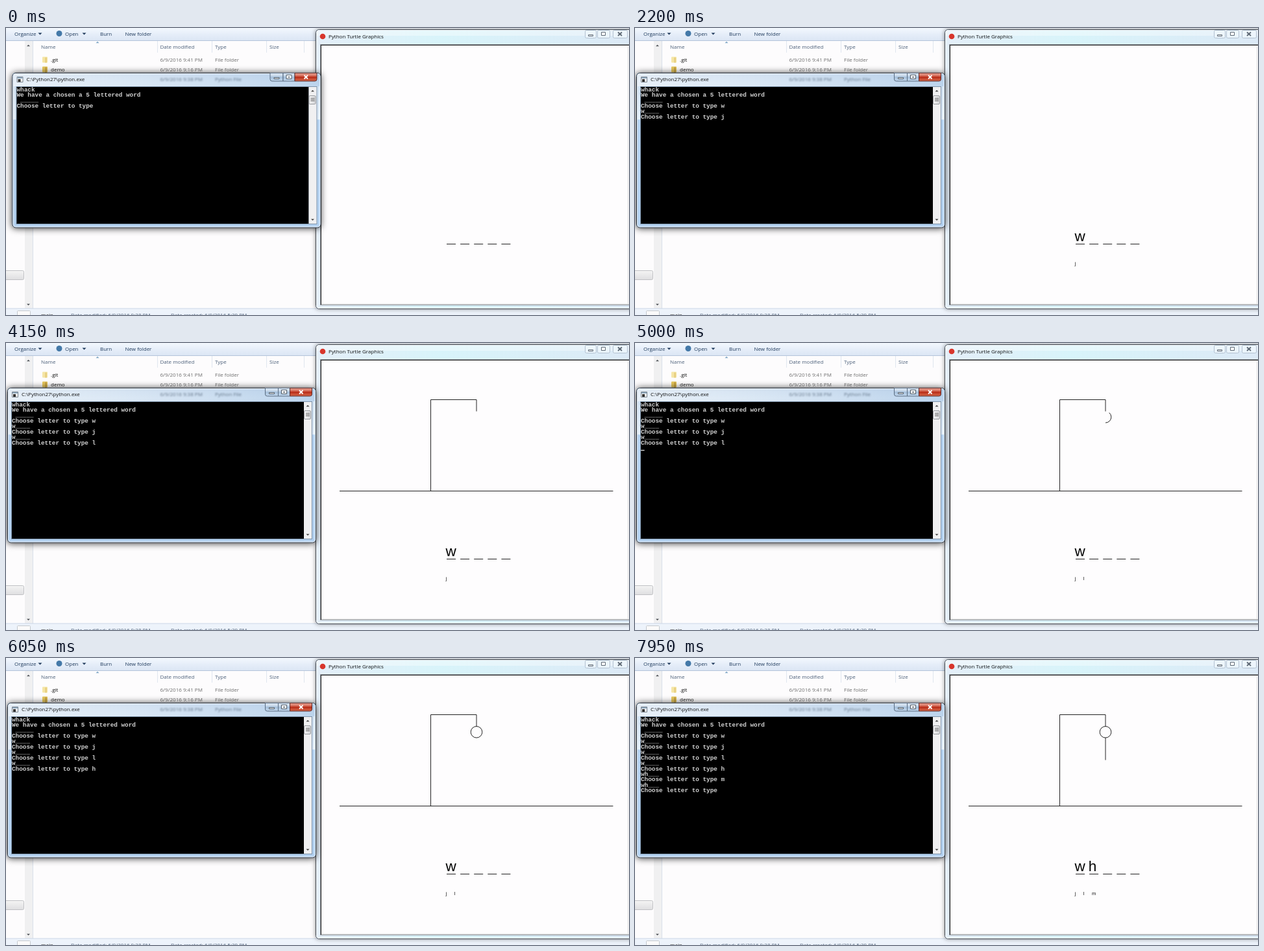
These frames come from a looping animation (960x443 px, 8000 ms). An HTML page with a canvas:

```html
<!DOCTYPE html>
<html>
<head>
<meta charset="utf-8">
<style>
html, body { margin: 0; width: 100%; height: 100%; overflow: hidden; background: #fdfcfd; }
canvas { display: block; }
</style>
</head>
<body>
<canvas id="stage" width="960" height="443"></canvas>
<script>
const ctx = document.getElementById('stage').getContext('2d');
const UI = '8px "Open Sans", "Noto Sans", sans-serif';
const MONO = 'bold 9.375px "Liberation Mono", monospace';
const LOOP = 8000, STEP = 50;

function rect(x, y, w, h, fill) {
  ctx.fillStyle = fill;
  ctx.fillRect(x, y, w, h);
}
function gradient(x0, y0, x1, y1, ...stops) {
  const g = ctx.createLinearGradient(x0, y0, x1, y1);
  stops.forEach(([at, color]) => g.addColorStop(at, color));
  return g;
}
function round(x, y, w, h, r, fill, stroke) {
  ctx.beginPath();
  ctx.roundRect(x, y, w, h, r);
  if (fill) { ctx.fillStyle = fill; ctx.fill(); }
  if (stroke) { ctx.strokeStyle = stroke; ctx.lineWidth = 1; ctx.stroke(); }
}
function text(str, x, y, color = '#1e395b', font = UI) {
  ctx.font = font;
  ctx.fillStyle = color;
  ctx.fillText(str, x, y);
}
function line(x0, y0, x1, y1, color = '#222', width = 1) {
  ctx.strokeStyle = color;
  ctx.lineWidth = width;
  ctx.beginPath();
  ctx.moveTo(x0, y0);
  ctx.lineTo(x1, y1);
  ctx.stroke();
}
function dot(x, y, r, color) {
  ctx.fillStyle = color;
  ctx.beginPath();
  ctx.arc(x, y, r, 0, 7);
  ctx.fill();
}
function arrow(x, y, size, dir, color) {
  ctx.fillStyle = color;
  ctx.beginPath();
  ctx.moveTo(x - size, y - dir * size / 2);
  ctx.lineTo(x + size, y - dir * size / 2);
  ctx.lineTo(x, y + dir * size / 2);
  ctx.fill();
}

function drawExplorer() {
  rect(0, 0, 960, 443, '#fdfcfd');
  rect(0, 0, 960, 19, gradient(0, 0, 0, 19, [0, '#f3f8fe'], [.5, '#e6eef9'], [1, '#dce6f4']));
  rect(0, 19, 960, 1, '#b4c4da');
  text('Organize', 13, 11.5);
  arrow(52.5, 9, 3, 1, '#1e395b');
  dot(82, 8.5, 4.5, '#4479a8');
  text('Open', 91, 11.5);
  arrow(120.5, 9, 3, 1, '#1e395b');
  text('Burn', 145, 11.5);
  text('New folder', 183.5, 11.5);

  // Navigation pane and its scrollbar
  rect(29, 20, 12, 413, '#f0f0f1');
  rect(41, 20, 1, 413, '#d9e0ea');
  arrow(34.5, 27, 2.5, -1, '#505459');
  arrow(34.5, 427, 2.5, 1, '#505459');
  round(-4.5, 374.5, 32, 14, 2, gradient(0, 374, 0, 389, [0, '#f5f5f5'], [1, '#dedee0']), '#bfc0c3');

  // File list
  const headings = [['Name', 54], ['Date modified', 237.5], ['Type', 322], ['Size', 406]];
  headings.forEach(([label, x]) => text(label, x, 32, '#4c607a'));
  [233.5, 317.5, 401.5, 459.5].forEach(x => line(x, 20, x, 38, '#dfe6ef'));
  arrow(141, 22, 2.5, -1, '#7ba4c4');
  const rows = [['.git', '6/9/2016 9:41 PM', 49], ['demo', '6/9/2016 9:16 PM', 64]];
  rows.forEach(([name, date, y], i) => {
    round(56, y - 4.5, 8, 9, 1, i ? '#e6c75c' : '#f5e5a6');
    rect(60, y - 3.5, 3, 8, i ? '#c9a545' : '#e8d184');
    text(name, 69, y + 3, '#111');
    text(date, 237.5, y + 3, '#6d6d6d');
    text('File folder', 322, y + 3, '#6d6d6d');
  });

  // Details strip
  rect(0, 433, 960, 10, '#edf3fb');
  rect(0, 432.5, 960, 1, '#cbd8e8');
  round(17.5, 436.5, 20, 12, 1, '#fafafa', '#c4c8cd');
  text('main', 54, 446, '#222');
  text('Date modified: 6/9/2016 9:38 PM', 100, 446, '#53657d');
  text('Date created: 6/9/2016 5:39 PM', 254, 446, '#53657d');
}

function drawTurtleWindow() {
  ctx.save();
  ctx.shadowColor = 'rgba(0,0,0,.45)';
  ctx.shadowBlur = 6;
  round(477, 2, 500, 432, 5, '#dbe8f5');
  ctx.restore();
  round(477.5, 2.5, 500, 431, 5, gradient(477, 0, 960, 0, [0, '#e4eef8'], [.4, '#d8f4fa'], [1, '#dce9f6']), '#40464e');
  round(478.5, 3.5, 500, 429, 4, null, '#f8fcff');
  rect(479, 4, 481, 8, 'rgba(255,255,255,.35)');
  dot(488, 13, 4.3, '#d8352c');
  text('Python Turtle Graphics', 497, 16, '#111');
  [[892, 17], [911, 19], [935, 22]].forEach(([x, w]) =>
    round(x + .5, 3.5, w, 12, 2, 'rgba(238,246,253,.8)', '#b3c1d0'));
  round(897.5, 10.5, 7, 2, 0, '#fff', '#5d6874');
  round(917.5, 6.5, 6, 5, 0, '#fff', '#5d6874');
  line(943, 6.5, 949, 12, '#5d6874', 1.8);
  line(949, 6.5, 943, 12, '#5d6874', 1.8);

  rect(484, 25, 476, 403, '#8b9097');
  rect(485, 26, 475, 401, '#262626');
  rect(486, 27, 474, 400, '#fefdfe');
  rect(486, 425.5, 474, 1.5, '#dedede');
  rect(958, 27, 1, 399, '#e0e0e0');
}

// One pen stroke, growing between two moments
function stroke(t, start, end, x0, y0, x1, y1) {
  const p = Math.min(1, (t - start) / (end - start));
  if (p > 0) line(x0, y0, x0 + (x1 - x0) * p, y0 + (y1 - y0) * p);
}

function drawHangman(t) {
  for (let i = 0; i < 5; i++) line(679 + 21.1 * i, 333.5, 693 + 21.1 * i, 333.5);
  const arial = size => size + 'px "Liberation Sans", sans-serif';
  const hits = [['w', 1250], ['h', 6450]];
  const misses = [['j', 1950], ['l', 4600], ['m', 7300]];
  hits.forEach(([c, at], i) => { if (t >= at) text(c, 677.6 + 21.1 * i, 328.7, '#000', arial(22.5)); });
  misses.forEach(([c, at], i) => { if (t >= at) text(c, 677.6 + 13.2 * i, 366, '#111', arial(7.5)); });

  stroke(t, 2200, 2750, 514, 228.5, 935.5, 228.5);
  stroke(t, 3150, 3317, 654.5, 228.5, 654.5, 87.5);
  stroke(t, 3400, 3550, 654.5, 87.5, 725, 87.5);
  stroke(t, 3650, 3725, 725, 87.5, 725, 105.5);
  const head = Math.min(1, (t - 4780) / 570);
  if (head > 0) {
    ctx.strokeStyle = '#222';
    ctx.lineWidth = 1;
    ctx.beginPath();
    ctx.arc(725, 114.3, 8.8, Math.PI / 2, Math.PI * (.5 - 2 * head), true);
    ctx.stroke();
  }
  stroke(t, 7700, 7850, 725, 123, 725, 157.5);
}

// letter, time typed, time entered, time of the next prompt, word shown then
const guesses = [
  ['w', 600, 850, 1400, 'w____'],
  ['j', 1600, 1950, 3750, 'w____'],
  ['l', 4050, 4550, 5350, 'w____'],
  ['h', 5450, 5850, 6600, 'wh___'],
  ['m', 6900, 7200, 7900, 'wh___']
];
const cursorOn = [[300, 450], [850, 1100], [1950, 2100], [2450, 2950], [4550, 4700],
  [4850, 5300], [5850, 6000], [6200, 6500], [7200, 7500]];

function consoleState(t) {
  const prompt = 'Choose letter to type ';
  const lines = ['whack', 'We have a chosen a 5 lettered word', ' _____', prompt];
  for (const [letter, typed, entered, answered, word] of guesses) {
    if (t >= typed) lines[lines.length - 1] += letter;
    if (t >= entered) lines.push('');
    if (t >= answered) {
      lines[lines.length - 1] = word;
      lines.push(prompt);
    }
  }
  return lines;
}

function drawConsole(t) {
  ctx.save();
  ctx.translate(Math.max(0, 7.5 - 2.5 * t / STEP), 0);

  ctx.save();
  ctx.shadowColor = 'rgba(0,0,0,.85)';
  ctx.shadowBlur = 11;
  ctx.shadowOffsetY = 1;
  round(2, 69, 475, 239, 5, '#b5d0ee');
  ctx.restore();
  round(2.5, 69.5, 475, 238.5, 5,
    gradient(0, 69, 0, 308, [0, '#c6d9ed'], [.09, '#d3e3f3'], [.3, '#e3eef9'], [.305, '#b6d3f1'], [1, '#b4d2f1']), '#26313d');
  round(3.5, 70.5, 473, 236.5, 4, null, 'rgba(255,255,255,.75)');
  rect(4, 71, 472, 19, gradient(4, 0, 476, 0, [0, 'rgba(255,255,255,.5)'], [.35, 'rgba(255,255,255,.25)'], [1, 'rgba(140,180,222,.3)']));

  round(9.5, 75.5, 9, 8, 0, '#f4f4f4', '#7b858e');
  rect(10, 76, 8, 2, '#8fa9bf');
  rect(11, 79, 4, 4, '#333');
  text('C:\\Python27\\python.exe', 24, 82, '#111');

  // Caption buttons
  const glass = gradient(0, 69, 0, 82, [0, '#dfeaf6'], [.45, '#c3d5e8'], [.5, '#a5bfda'], [1, '#c4d9ee']);
  const red = gradient(0, 69, 0, 82, [0, '#e8aa9c'], [.45, '#d2604c'], [.5, '#b82c18'], [1, '#d9694a']);
  round(399.5, 69.5, 20, 12.5, [0, 0, 0, 3], glass, '#596b80');
  round(419.5, 69.5, 18, 12.5, 0, glass, '#596b80');
  round(437.5, 69.5, 34, 12.5, [0, 0, 3, 0], red, '#5b2f2f');
  round(405.5, 76.5, 8, 2, 0, '#fff', '#4d5965');
  round(424.5, 72.5, 8, 6, 0, '#fff', '#4d5965');
  rect(427, 75, 3, 1.5, '#4d5965');
  line(452, 73, 457.5, 78.5, '#fff', 1.8);
  line(457.5, 73, 452, 78.5, '#fff', 1.8);

  rect(8, 90, 464, 213, '#7d93aa');
  rect(9, 91, 450, 211, '#000');
  rect(459, 91, 12, 211, '#f0f0f1');
  arrow(465, 97, 2.5, -1, '#444');
  arrow(465, 296, 2.5, 1, '#444');
  round(459.5, 104.5, 10, 13, 1.5, gradient(459, 0, 470, 0, [0, '#f6f6f6'], [1, '#d2d3d6']), '#989b9f');
  [108.5, 110.5, 112.5].forEach(y => line(462, y, 468, y, '#777'));

  const lines = consoleState(t);
  lines.forEach((str, i) => text(str, 9, 97.6 + 8.44 * i, '#d0d0d0', MONO));
  if (cursorOn.some(([from, to]) => t >= from && t < to)) {
    const row = lines.length - 1;
    rect(9 + 5.625 * lines[row].length, 97.4 + 8.44 * row, 5.6, 1.4, '#d0d0d0');
  }
  ctx.restore();
}

// Listing behind the glass title bar, seen out of focus
function drawGlassBlur() {
  ctx.save();
  ctx.filter = 'blur(1.3px)';
  text('6/9/2016 9:38 PM', 237.5, 82, 'rgba(70,85,105,.75)');
  text('Python File', 322, 82, 'rgba(70,85,105,.75)');
  ctx.restore();
}

function frame(now) {
  const t = Math.floor(now % LOOP / STEP) * STEP;
  drawExplorer();
  drawTurtleWindow();
  drawHangman(t);
  drawConsole(t);
  drawGlassBlur();
  requestAnimationFrame(frame);
}
const begin = performance.now();
requestAnimationFrame(function tick() {
  frame.call(null, performance.now() - begin);
});
</script>
</body>
</html>
```
